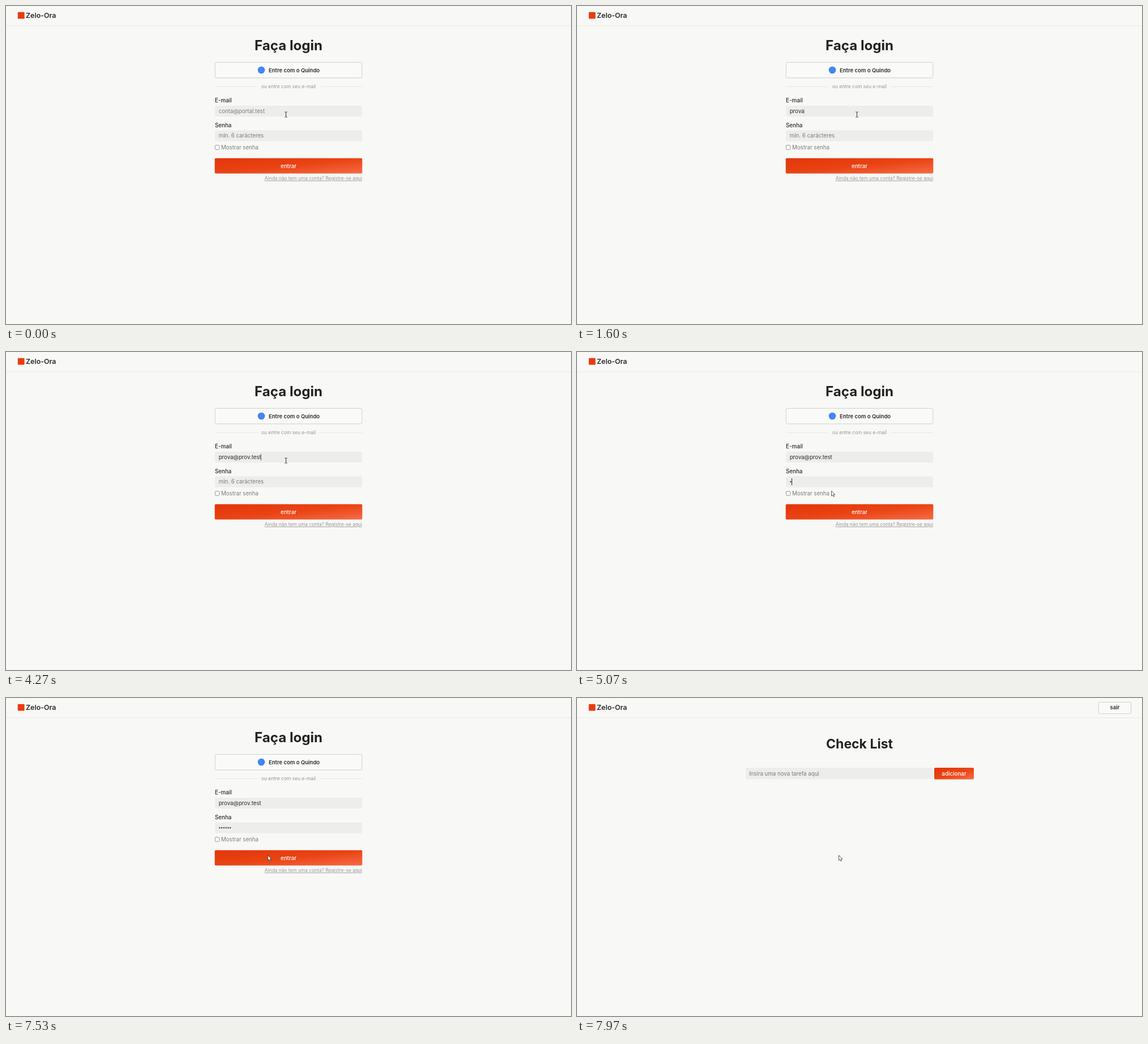
Write an HTML page that moves like this. It is 998 by 561 pixels and loops after 8 s.

```html
<!DOCTYPE html>
<html lang="pt-BR">
<head>
<meta charset="utf-8">
<title>Login</title>
<style>
html, body { margin: 0; width: 100%; height: 100%; overflow: hidden; background: #f8f8f7; }
svg { display: block; width: 100%; height: 100%; }
text { font: 400 9.7px Inter, "Open Sans", sans-serif; font-optical-sizing: none; fill: #2a2a28; white-space: pre; }
.title { font-size: 24.1px; font-weight: 700; fill: #222; }
.brand { font-size: 12.4px; font-weight: 600; }
.strong { font-size: 9.5px; font-weight: 600; }
.label { font-size: 9.8px; font-weight: 500; }
.light { font-size: 9.8px; font-weight: 500; fill: #fff; }
.hint { fill: #7c7c7a; }
.small { font-size: 8.4px; fill: #959592; }
.link { text-decoration: underline; }
.mid { text-anchor: middle; }
.end { text-anchor: end; }
.field { fill: #ededec; }
.outline { fill: #fafaf9; stroke: #cfcfc8; }
.rule { stroke: #e8e7da; }
</style>
</head>
<body>
<svg viewBox="0 0 998 561">
  <defs>
    <linearGradient id="orange" x1="0" y1="0" x2="1" y2="1">
      <stop offset="0" stop-color="#e2360a"/>
      <stop offset=".5" stop-color="#ea4314"/>
      <stop offset="1" stop-color="#f56c46"/>
    </linearGradient>
  </defs>
  <rect width="998" height="561" fill="#f8f8f7"/>
  <path class="rule" d="M0 34.8H998"/>
  <rect x="20.8" y="10.8" width="11.8" height="11.8" rx="1" fill="#e83c0f"/>
  <text class="brand" x="35" y="21">Zelo-Ora</text>

  <g id="login">
    <text class="title mid" x="499" y="77.5">Faça login</text>
    <rect class="outline" x="369.3" y="99.4" width="259.4" height="27.4" rx="2"/>
    <circle cx="451" cy="113" r="6.3" fill="#4285f4"/>
    <text class="strong" x="464" y="116.5">Entre com o Quindo</text>
    <path class="rule" d="M369 142.3H444M554 142.3H629"/>
    <text class="small mid" x="499" y="145">ou entre com seu e-mail</text>

    <text class="label" x="369" y="170">E-mail</text>
    <rect class="field" x="369" y="176" width="260" height="19" rx="2"/>
    <text id="email" x="375.7" y="188.6"></text>

    <text class="label" x="369" y="213.6">Senha</text>
    <rect class="field" x="369" y="219.5" width="260" height="19" rx="2"/>
    <text id="passHint" class="hint" x="375.7" y="232.4">min. 6 carácteres</text>
    <g id="dots" fill="#2a2a28"></g>

    <rect x="369.4" y="245.7" width="7.4" height="7.4" rx="1.5" fill="#fff" stroke="#888" stroke-width=".9"/>
    <text class="hint" x="380" y="252.8">Mostrar senha</text>
    <rect x="368.7" y="268.6" width="260.6" height="27" rx="2" fill="url(#orange)"/>
    <text class="light mid" x="499" y="285.5">entrar</text>
    <text class="small link end" x="629" y="307">Ainda não tem uma conta? Registre-se aqui</text>
    <rect id="caret" width="1" height="12" fill="#222"/>
  </g>

  <g id="tasks">
    <rect class="outline" x="921.3" y="7.4" width="57.4" height="20.2" rx="2"/>
    <text class="strong mid" x="950" y="20.4">sair</text>
    <text class="title mid" style="font-size:23px" x="499" y="88.5">Check List</text>
    <rect class="field" x="298" y="123" width="330" height="20" rx="2"/>
    <text class="hint" x="304" y="136.6">Insira uma nova tarefa aqui</text>
    <rect x="631" y="123" width="70" height="20.5" rx="2" fill="url(#orange)"/>
    <text class="light mid" x="666" y="136.6">adicionar</text>
  </g>

  <g id="pointer">
    <path id="beam" d="M-2.3 -4.5H-.6L0 -4L.6 -4.5H2.3M0 -4V4M-2.3 4.5H-.6L0 4L.6 4.5H2.3" fill="none" stroke="#333"/>
    <path id="arrow" d="M0 0V9L2.1 7.1L3.6 10.3L5.1 9.6L3.7 6.6H6.3Z" fill="#fff" stroke="#333" stroke-width=".8"/>
  </g>
</svg>
<script>
const LOOP = 8000;
const EMAIL = "prova@prov.test", EMAIL_HINT = "conta@portal.test";
const EMAIL_KEYS = [400, 500, 700, 900, 1200, 2200, 2470, 2600, 2800, 3170, 3300, 3470, 3600, 3730, 3870];
const PASS_KEYS = [5070, 5370, 5600, 5870, 6170, 6420];
const PASS_FOCUS = 4570, SUBMIT = 6870, PAGE_CHANGE = 7570;
const DOT_STEP = 3.75;
// Pointer stops: time, x, y
const PATH = [[4300, 494.5, 191.5], [4780, 449.5, 245], [6480, 449.5, 245], [6720, 467, 288], [6880, 462.5, 277.5]];

const $ = id => document.getElementById(id);
const set = (el, attrs) => { for (const k in attrs) el.setAttribute(k, attrs[k]); };
const show = (el, on) => set(el, { visibility: on ? "inherit" : "hidden" });
const ramp = (t, from, to) => Math.min(1, Math.max(0, (t - from) / (to - from)));
const smooth = u => u * u * (3 - 2 * u);
const typed = (keys, t) => keys.filter(k => k <= t).length;

const dots = PASS_KEYS.map((_, i) => {
  const dot = document.createElementNS("http://www.w3.org/2000/svg", "circle");
  set(dot, { cx: 377.4 + i * DOT_STEP, cy: 229, r: 1.15 });
  return $("dots").appendChild(dot);
});

function pointerAt(t) {
  let [, x, y] = PATH[0];
  for (let i = 1; i < PATH.length; i++) {
    const [t0, x0, y0] = PATH[i - 1], [t1, x1, y1] = PATH[i];
    if (t < t0) break;
    const u = smooth(ramp(t, t0, t1));
    x = x0 + (x1 - x0) * u;
    y = y0 + (y1 - y0) * u;
  }
  return [x, y];
}

function drawFields(t) {
  const chars = typed(EMAIL_KEYS, t), count = typed(PASS_KEYS, t);
  const email = $("email");
  email.textContent = chars ? EMAIL.slice(0, chars) : EMAIL_HINT;
  email.setAttribute("class", chars ? "" : "hint");
  show($("passHint"), !count);
  dots.forEach((dot, i) => show(dot, i < count));

  const inPass = t >= PASS_FOCUS;
  const x = 375.2 + (inPass ? count * DOT_STEP : chars ? email.getComputedTextLength() : 0);
  const blink = 1 - ramp(t, 1480, 1620) + ramp(t, 2030, 2130);
  const opacity = inPass ? 1 : Math.min(blink, 1 - ramp(t, 4220, 4350));
  set($("caret"), { x: Math.round(x), y: inPass ? 223 : 179.5, opacity });
  show($("caret"), t >= EMAIL_KEYS[0] && t < SUBMIT);
}

function drawPointer(t) {
  const [x, y] = pointerAt(t);
  const overField = (y > 176 && y < 195) || (y > 219 && y < 239);
  set($("pointer"), { transform: `translate(${x} ${y})` });
  show($("beam"), overField);
  show($("arrow"), !overField);
}

function draw(t) {
  drawFields(t);
  drawPointer(t);
  show($("login"), t < PAGE_CHANGE);
  show($("tasks"), t >= PAGE_CHANGE);
  set($("tasks"), { opacity: smooth(ramp(t, PAGE_CHANGE - 60, 7900)) });
}

const start = performance.now();
function tick() {
  draw((performance.now() - start) % LOOP);
  requestAnimationFrame(tick);
}
tick();
</script>
</body>
</html>
```
